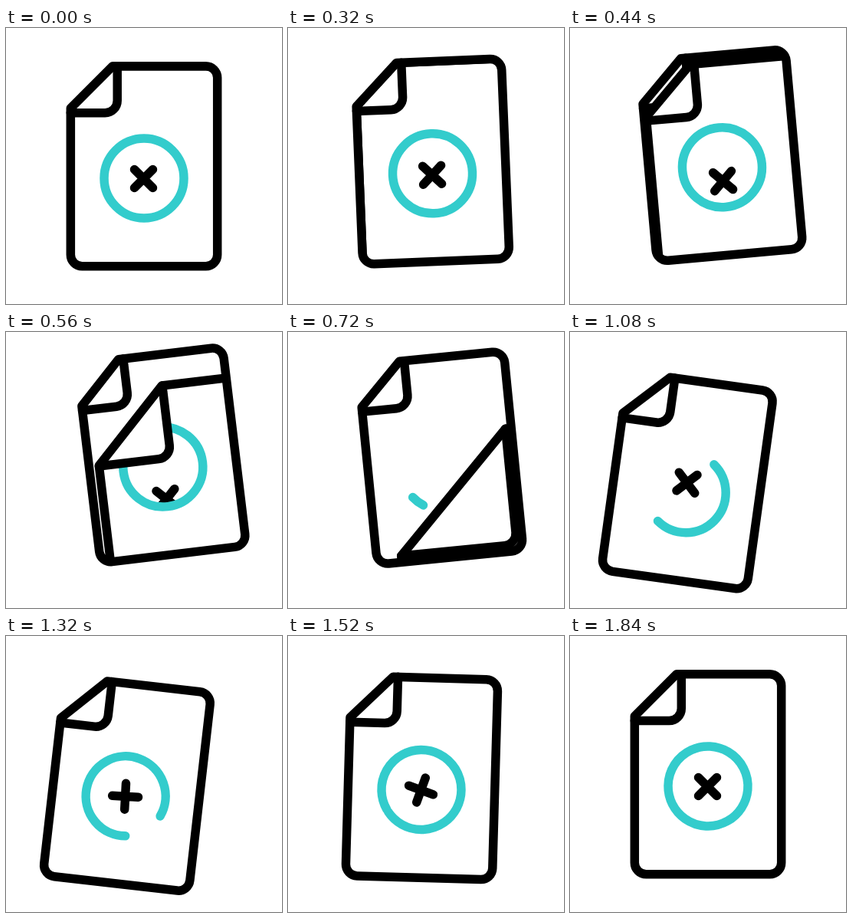
An HTML page for the animation above (2000 ms loop, 360 px wide and 360 px high).

```html
<!DOCTYPE html>
<html lang="en">
<head>
<meta charset="utf-8">
<title>Document turning over</title>
<style>
  html, body { margin: 0; width: 100%; height: 100%; overflow: hidden; background: #fff; }
  svg { display: block; width: 100vw; height: 100vh; }
  .line { fill: none; stroke: #000; stroke-width: 11.5; stroke-linecap: round; stroke-linejoin: round; }
  .white { fill: #fff; }
  .ring { fill: none; stroke: #33cccc; stroke-width: 11.5; stroke-linecap: round; }
</style>
</head>
<body>
<svg viewBox="0 0 360 360">
  <defs>
    <path id="outline" d="M139 49.8H260.7a15 15 0 0 1 15 15V295.8a15 15 0 0 1-15 15H99.3a15 15 0 0 1-15-15V104.5Z"/>
    <path id="cross" d="M-12-12L12 12M12-12L-12 12"/>
    <clipPath id="page"><use href="#outline"/></clipPath>
    <clipPath id="hole"><circle cx="180" cy="196" r="47"/></clipPath>
    <clipPath id="unfolded"><path id="side"/></clipPath>
  </defs>
  <g id="doc">
    <use href="#outline" class="white"/>
    <path class="line" d="M145.3 49.8V94.5a16 16 0 0 1-16 16H84.3"/>
    <g clip-path="url(#hole)"><use id="crossIn" href="#cross" class="line"/></g>
    <path id="arc" class="ring"/>
    <g id="sheet" clip-path="url(#page)">
      <path id="paper" class="white"/>
      <g clip-path="url(#unfolded)">
        <g clip-path="url(#hole)"><use id="crossOut" href="#cross" class="line"/></g>
        <circle class="ring" cx="180" cy="196" r="52"/>
      </g>
      <path id="flap" class="line white"/>
      <path id="edge" class="line"/>
    </g>
    <use href="#outline" class="line"/>
  </g>
</svg>
<script>
const LOOP = 2000, STEP = 40;
const el = id => document.getElementById(id);
const set = (id, name, value) => el(id).setAttribute(name, value);
const show = (id, on) => { el(id).style.display = on ? '' : 'none'; };
const mix = (a, b, p) => a + (b - a) * p;
const span = (t, from, to) => Math.min(1, Math.max(0, (t - from) / (to - from)));
const smooth = u => u * u * (3 - 2 * u);

// Ease with flat ends; a and b are the horizontal handle positions.
function ease(u, a, b) {
  let lo = 0, hi = 1;
  for (let i = 0; i < 24; i++) {
    const s = (lo + hi) / 2, r = 1 - s;
    if (3 * r * r * s * a + 3 * r * s * s * b + s * s * s < u) lo = s; else hi = s;
  }
  return smooth(lo);
}

// x, y, degrees; bow bends the path downwards between two poses
const REST = [0, 0, 0], RIGHT = [23, -20, -6.9], LEFT = [-27, 14, 8];
const SWAY = [
  { from: 40, to: 580, a: REST, b: RIGHT, ease: [.6, .7], bow: 3 },
  { from: 580, to: 1120, a: RIGHT, b: LEFT, ease: [.6, .48], bow: 13 },
  { from: 1120, to: 1840, a: LEFT, b: REST, ease: [.5, .25], bow: 10 }
];

function sway(t) {
  const k = SWAY.find(s => t < s.to) || SWAY[2];
  const p = ease(span(t, k.from, k.to), ...k.ease);
  const [x, y, r] = k.a.map((v, i) => mix(v, k.b[i], p));
  const dip = k.bow * p * (1 - p);
  set('doc', 'transform', `translate(${x} ${y + dip}) rotate(${r} 180 180)`);
}

// The top sheet slides and folds away towards the lower right.
function peel(t) {
  const p = smooth(span(t, 347, 1047));
  show('sheet', p < 1);
  const fold = mix(188.8, 608, p);
  const top = mix(49.8, 234, p), left = mix(84.3, 143, p);
  const x = fold - top, y = fold - left;
  const gap = 6.2 * Math.max(0, 1 - 4 * p);
  const border = `M330 ${top}H${x}L${left} ${y}V380`;
  set('paper', 'd', border + 'H330Z');
  set('edge', 'd', border);
  set('side', 'd', `M${fold} 0H700V700H${fold - 700}Z`);
  set('flap', 'd', `M${x + gap} ${top}V${y + gap - 16}a16 16 0 0 1-16 16H${left}`);
}

function ring(t) {
  const p = smooth(span(t, 580, 1580));
  show('arc', p > 0);
  const start = 101 + 412 * p, sweep = Math.min(359.9, 360 * p);
  const at = deg => {
    const a = deg * Math.PI / 180;
    return `${180 + 52 * Math.cos(a)} ${196 + 52 * Math.sin(a)}`;
  };
  set('arc', 'd', `M${at(start)}A52 52 0 ${sweep > 180 ? 1 : 0} 1 ${at(start + sweep)}`);
}

// One cross drops out of the ring, the next drops in and spins.
function crosses(t) {
  const out = 65 * smooth(span(t, 280, 750));
  const drop = -65 * (1 - smooth(span(t, 840, 1180)));
  const spin = 180 * ease(span(t, 1120, 1840), .5, .13);
  set('crossOut', 'transform', `translate(179.5 ${196.5 + out})`);
  set('crossIn', 'transform', `translate(179.5 ${196.5 + drop}) rotate(${spin})`);
}

const begin = performance.now();
function tick() {
  const t = Math.floor((performance.now() - begin) % LOOP / STEP) * STEP;
  sway(t);
  peel(t);
  ring(t);
  crosses(t);
  requestAnimationFrame(tick);
}
tick();
</script>
</body>
</html>
```
